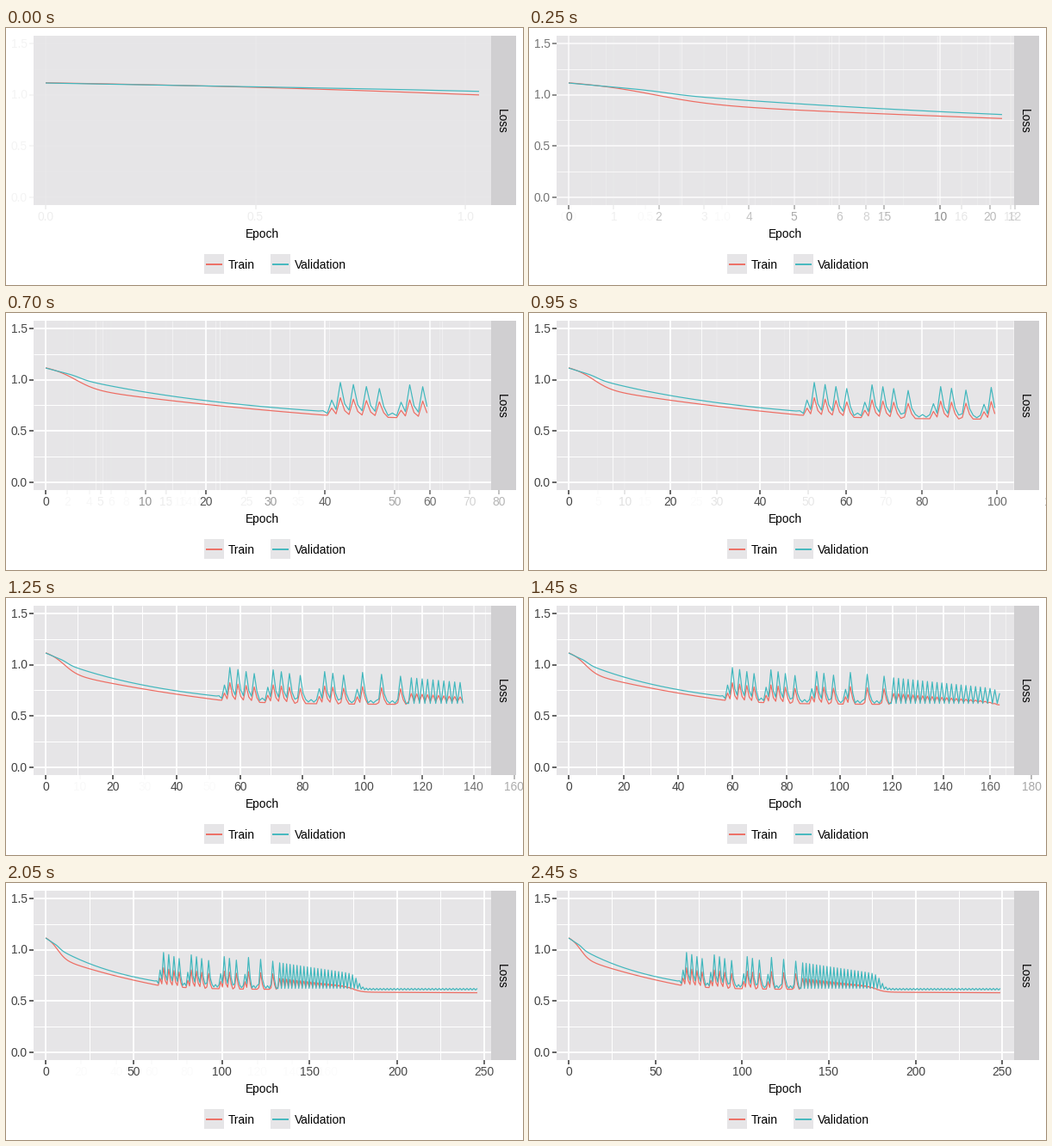
Write a matplotlib script that moves like this. It is 600 px wide and 299 px high and loops after 2550 ms.

```python
import math

import numpy as np
import matplotlib.pyplot as plt
from matplotlib.animation import FuncAnimation
from matplotlib.patches import Rectangle

W, H, DPI = 600, 299, 100
FRAMES, INTERVAL = 51, 50
PX = 72 / DPI
LEFT, RIGHT, TOP, BOTTOM = 32, 563, 9, 206
X0, SPAN = 46, 503
Y0, Y_UNIT = 196.8, 119.2
LAST = 249
RED, TEAL = "#ee6c62", "#41b7bd"
PANEL, STRIP, INK, LABEL = "#e6e5e7", "#d0cfd1", "#333333", "#404040"

plt.rcParams["font.family"] = "Liberation Sans"
plt.rcParams["font.size"] = 13.7 * PX


# ---- loss curves, one value per epoch ----
def drop(e, centre, width):
    """Smooth step from one down to zero."""
    return 1 / (1 + np.exp((e - centre) / width))


def decay(e, floor, height, tau):
    return floor + height * np.exp(-e / tau)


def spikes(e):
    """Clusters of sharp peaks, each announced by a small one."""
    bump = np.zeros(len(e))
    for start, count, gap in ((68, 4, 3), (84, 4, 3.25), (103, 3, 3.5), (117, 3, 7.2)):
        bump[start - 2] = .12
        for i in range(count):
            p = round(start + i * gap)
            rise = .295 - .015 * i - .0002 * (p - 68)
            for shift, part in ((-1, .1), (0, 1), (1, .3)):
                bump[p + shift] = max(bump[p + shift], part * rise)
    return bump


def make_losses():
    e = np.arange(LAST + 1)
    odd = e % 2

    # smooth descent
    train = decay(e, .324, .632, 99) + .17 * drop(e, 7, 2.5)
    val = decay(e, .559, .525, 46.5) + .03 * drop(e, 8, 1)

    # irregular spikes
    bump = spikes(e)
    wiggle = np.where(bump == 0, .012 - .024 * odd, 0)
    spiky = e > 63
    train[spiky] = (decay(e - 64, .612, .043, 20) + .6 * bump)[spiky]
    val[spiky] = (decay(e - 64, .63, .055, 30) + bump + wiggle)[spiky]

    # regular zigzag that dies out
    late = e > 133
    t = e - 135
    swing_t = .08 * np.clip(1 - t / 45, 0, 1)
    swing_v = (.235 - .0025 * t) * drop(e, 180, 1.3) + .015
    train[late] = (.589 + .05 * drop(e, 178, 2.5) - .00008 * t + odd * swing_t)[late]
    val[late] = (.607 + .015 * drop(e, 182, 1) + odd * swing_v)[late]
    return train, val


# ---- x axis ----
def last_epoch(f):
    return min(LAST, round(7 + 5.65 * f + .0095 * f * f))


def nice_domain(end):
    """Round the axis end up to a whole number of 1-2-5 steps."""
    raw = end / 5
    power = 10 ** math.floor(math.log10(raw))
    ratio = raw / power
    factor = 10 if ratio >= 7.07 else 5 if ratio >= 3.61 else 2 if ratio >= 1.414 else 1
    step = factor * power
    return math.ceil(end / step) * step, step


def tick_keys(domain, step):
    """(value, label) pairs; an empty label marks a minor line."""
    n = round(domain / step)
    major = [(i * step, str(round(i * step))) for i in range(n + 1)]
    return major + [((i + .5) * step, "") for i in range(n)]


def axis_states():
    """Ticks chase the newest scale one frame late while fading in and out."""
    ticks = {(v, f"{v:.1f}"): [v * 487, .09] for v in (0, .5, 1)}
    states = [{k: tuple(s) for k, s in ticks.items()}]
    old_scale = 100
    for f in range(1, FRAMES):
        domain, step = nice_domain(last_epoch(f - 1))
        scale = SPAN / domain
        wanted = tick_keys(domain, step)
        rate = .2 + .00008 * f * f
        for key in wanted:
            ticks.setdefault(key, [key[0] * old_scale, 0])
        for key, s in ticks.items():
            s[0] += rate * (key[0] * scale - s[0])
            s[1] += rate * ((key in wanted) - s[1])
        old_scale = scale
        states.append({k: tuple(s) for k, s in ticks.items()})
    return states


# ---- static parts ----
fig = plt.figure(figsize=(W / DPI, H / DPI), dpi=DPI, facecolor="white")
ax = fig.add_axes([0, 0, 1, 1])
ax.set_xlim(0, W)
ax.set_ylim(H, 0)
ax.axis("off")


def box(x, y, w, h, color, z=0):
    return ax.add_patch(Rectangle((x, y), w, h, fc=color, ec="none", zorder=z))


def line(xs, ys, color, width, z):
    return ax.plot(xs, ys, color=color, lw=width * PX, zorder=z,
                   solid_capstyle="butt", solid_joinstyle="round")[0]


def y_px(loss):
    return Y0 - Y_UNIT * loss


panel = box(LEFT, TOP, RIGHT - LEFT, BOTTOM - TOP, PANEL)
box(RIGHT, TOP, 28.5, BOTTOM - TOP, STRIP, 2)
ax.text(574.5, 108, "Loss", rotation=-90, ha="center", va="center", color="black", zorder=4)
ax.text(297.5, 243.7, "Epoch", ha="center", color="black")
for x, name, color in ((230, "Train", RED), (307, "Validation", TEAL)):
    box(x, 263, 23, 23, PANEL)
    line([x + 2, x + 21], [274.5, 274.5], color, 1.9, 3)
    ax.text(x + 28, 280, name, color="black")

y_parts = []
for i in range(7):
    loss, major = i / 4, i % 2 == 0
    y = y_px(loss)
    y_parts.append(line([LEFT, RIGHT], [y, y], "white", 1.9 if major else 1, 1))
    if major:
        y_parts.append(line([27, LEFT], [y, y], INK, 1.5, 2))
        y_parts.append(ax.text(24.7, y + 4.8, f"{loss:.1f}", ha="right", color=LABEL))

# ---- moving parts ----
train, val = make_losses()
train_line = line([], [], RED, 1.2, 3)
val_line = line([], [], TEAL, 1.2, 3.1)
STATES = axis_states()

x_parts = {}
for key in STATES[-1]:
    label = key[1]
    grid = line([0, 0], [TOP, BOTTOM], "white", 1.9 if label else 1, 1)
    grid.set_clip_path(panel)
    x_parts[key] = [grid]
    if label:
        x_parts[key] += [line([0, 0], [BOTTOM, BOTTOM + 4.5], INK, 1.5, 2),
                         ax.text(0, 224, label, ha="center", color=LABEL)]


def place_tick(parts, x, alpha):
    shown = alpha > .015 and x < W + 20
    for part in parts:
        part.set_visible(shown)
        part.set_alpha(alpha)
        if hasattr(part, "set_xdata"):
            part.set_xdata([x, x])
        else:
            part.set_x(x)


def draw(f):
    end = last_epoch(f)
    domain, _ = nice_domain(end)
    xs = X0 + np.arange(end + 1) * SPAN / domain
    train_line.set_data(xs, y_px(train[:end + 1]))
    val_line.set_data(xs, y_px(val[:end + 1]))

    for part in y_parts:
        part.set_alpha(1 - .94 * .78 ** f)
    for key, parts in x_parts.items():
        offset, alpha = STATES[f].get(key, (0, 0))
        place_tick(parts, X0 + offset, alpha)
    return []


anim = FuncAnimation(fig, draw, frames=FRAMES, interval=INTERVAL,
                     init_func=lambda: [], repeat=True, repeat_delay=0)
plt.show()
```
